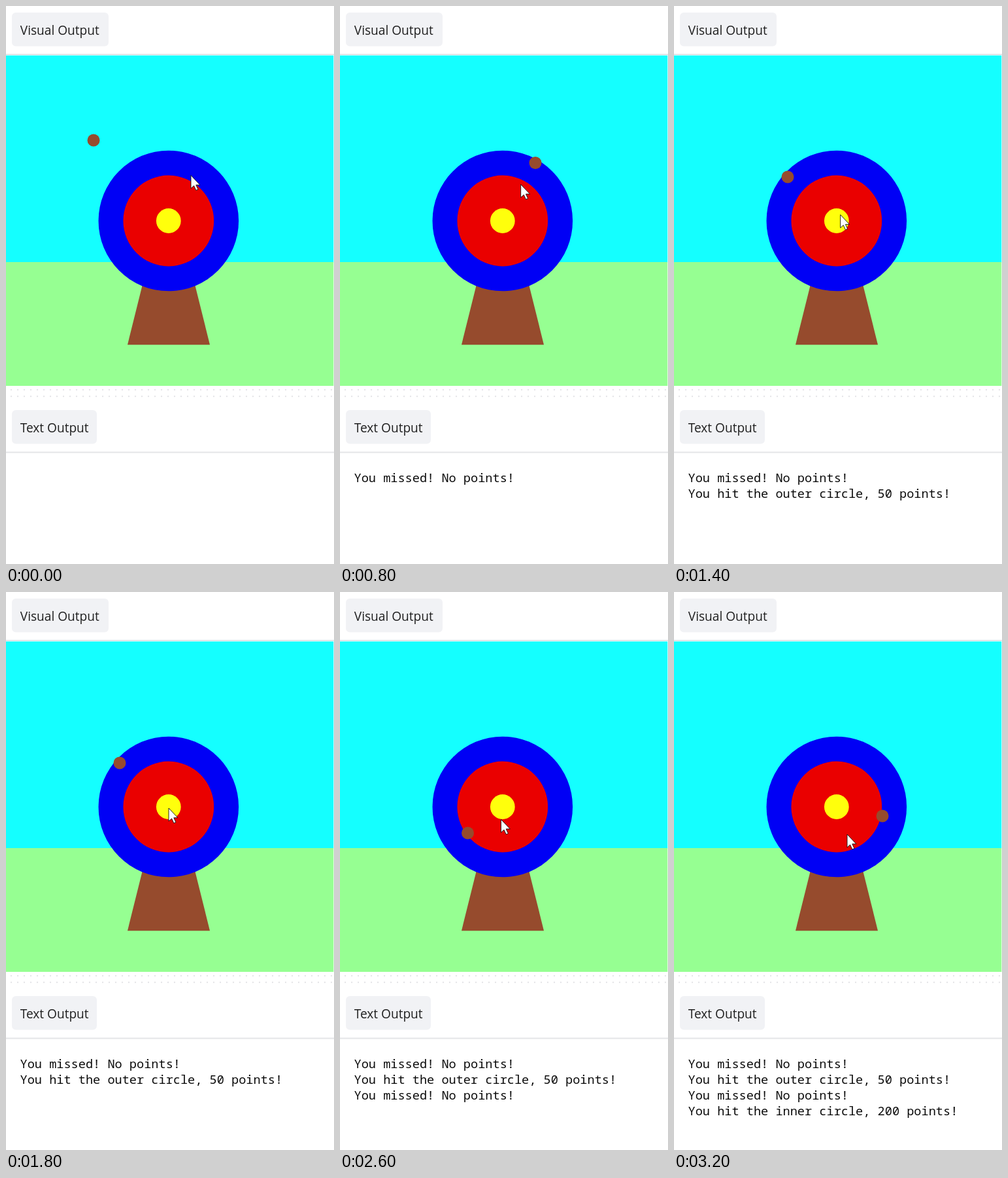
Animation, 502 px wide and 852 px high, one loop 3300 ms. Source, as an HTML page:

```html
<!DOCTYPE html>
<html lang="en">
<head>
<meta charset="utf-8">
<title>Target practice</title>
<style>
  html, body { margin: 0; width: 100%; height: 100%; overflow: hidden; background: #fff; }
  svg { display: block; width: 502px; height: 852px; }
  .label { font: 19.1px "Open Sans", "Noto Sans", sans-serif; fill: #1f1f1f; }
  .log { font: 18.6px "Noto Sans Mono", "DejaVu Sans Mono", monospace; fill: #0c0c0c; white-space: pre; }
  .tab { fill: #f1f2f5; }
  .rule { fill: #e4e5e8; }
  .wood { fill: #964b2d; }
</style>
</head>
<body>
<svg viewBox="0 0 502 852">
  <defs>
    <pattern id="dots" x="3" y="581" width="10" height="10" patternUnits="userSpaceOnUse">
      <circle cx="5" cy="5" r="1.2" fill="#e6e6e9"/>
    </pattern>
  </defs>

  <rect class="tab" x="9" y="10" width="148" height="51.5" rx="6"/>
  <text class="label" x="21.8" y="44">Visual Output</text>
  <rect class="rule" y="73" width="502" height="2"/>

  <rect y="75.5" width="501.3" height="316" fill="#14ffff"/>
  <rect y="391" width="501.3" height="189" fill="#96ff92"/>
  <path class="wood" d="M186 517.2L249 264.5L312 517.2Z"/>
  <circle cx="248.8" cy="328" r="107.3" fill="#0000f5"/>
  <circle cx="248.8" cy="328" r="69.4" fill="#ea0000"/>
  <circle cx="248.8" cy="328" r="18.9" fill="#ffff0c"/>
  <circle id="arrow" class="wood" r="9.5"/>

  <rect x="3" y="581" width="499" height="20" fill="url(#dots)"/>
  <rect class="tab" x="9" y="617" width="130" height="51.5" rx="6"/>
  <text class="label" x="21.8" y="651">Text Output</text>
  <rect class="rule" y="680.5" width="502" height="2"/>
  <g id="log"></g>

  <path id="pointer" d="M0 0V20L4.6 15.9L7.8 22.9L11 21.6L7.8 14.7H13.9Z"
        fill="#fff" stroke="#111" stroke-width=".9"/>
</svg>
<script>
  const LOOP = 3300, STEP = 100;
  const byId = id => document.getElementById(id);
  const arrow = byId("arrow"), pointer = byId("pointer"), log = byId("log");

  // time, x, y
  const shots = [
    [0, 134, 205], [400, 299, 239.5], [900, 294, 384.5], [1400, 174, 261],
    [1900, 145, 368], [2400, 195.5, 368], [2900, 319, 342]
  ];
  const moves = [
    [0, 283, 258.5], [600, 283, 258.5], [1100, 265, 298], [1600, 249, 330],
    [2300, 249, 330], [2800, 245, 356.5], [3200, 265, 370]
  ];
  const messages = [
    [300, "You missed! No points!"],
    [1100, "You hit the outer circle, 50 points!"],
    [2200, "You missed! No points!"],
    [2700, "You hit the inner circle, 200 points!"]
  ];

  const lines = messages.map(([time, words], i) => {
    const el = document.createElementNS("http://www.w3.org/2000/svg", "text");
    el.setAttribute("class", "log");
    el.setAttribute("x", 21.5);
    el.setAttribute("y", 726.5 + i * 24);
    el.textContent = words;
    log.append(el);
    return { el, time };
  });

  const lastIndex = (rows, t) => rows.findLastIndex(row => row[0] <= t);
  const place = (el, x, y) => el.setAttribute("transform", `translate(${x} ${y})`);

  function glide(rows, t) {
    const i = lastIndex(rows, t);
    const [t0, x0, y0] = rows[i];
    const [t1, x1, y1] = rows[i + 1] || [t0 + 1, x0, y0];
    const k = (t - t0) / (t1 - t0);
    const ease = k * k * (3 - 2 * k);
    return [x0 + (x1 - x0) * ease, y0 + (y1 - y0) * ease];
  }

  function draw(t) {
    const [, x, y] = shots[lastIndex(shots, t)];
    place(arrow, x, y);
    place(pointer, ...glide(moves, t));
    for (const { el, time } of lines) el.style.visibility = t >= time ? "visible" : "hidden";
  }

  const start = performance.now();
  function tick() {
    const t = (performance.now() - start) % LOOP;
    draw(Math.floor(t / STEP) * STEP);
    requestAnimationFrame(tick);
  }
  tick();
</script>
</body>
</html>
```
